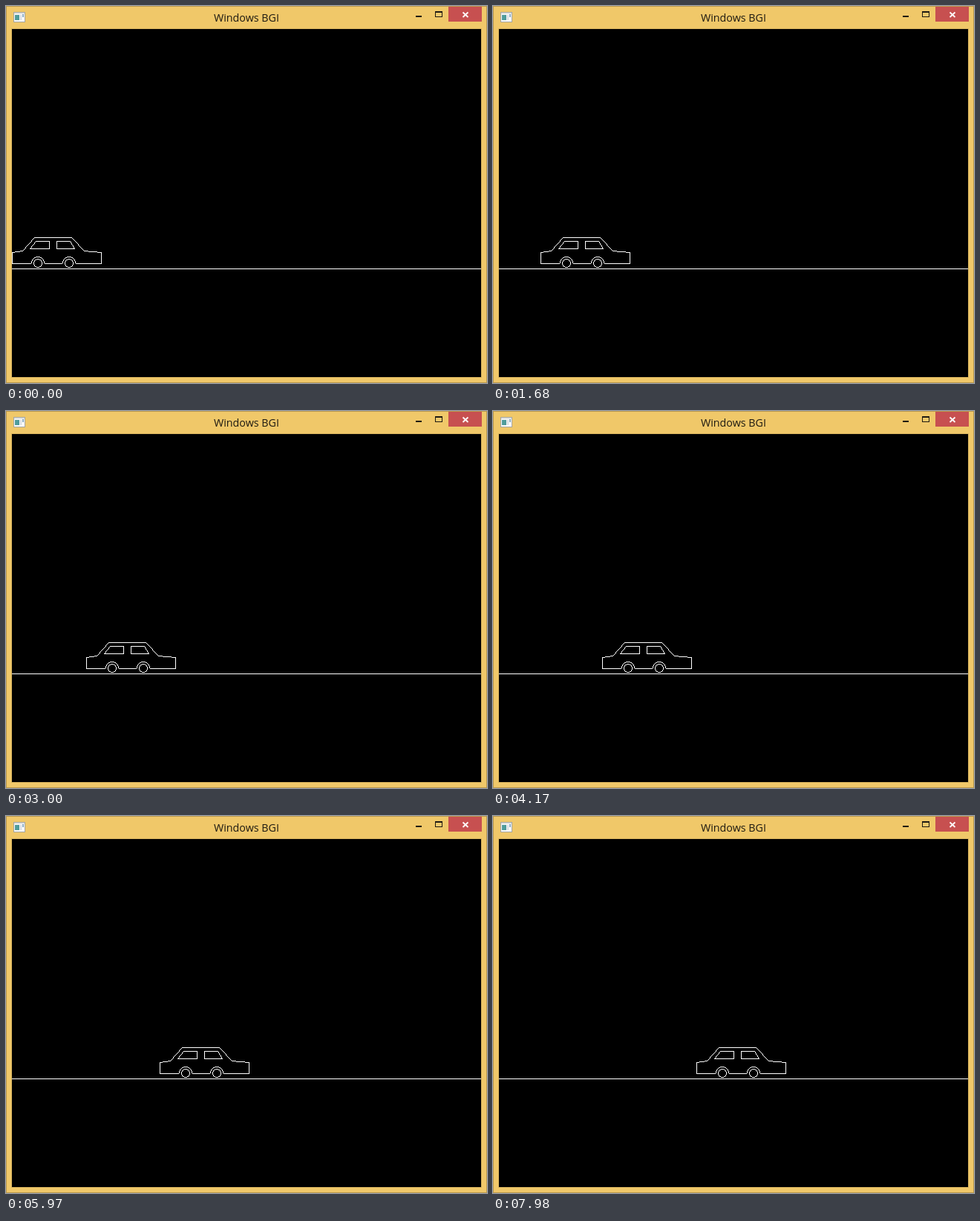
An HTML page with a canvas that plays this animation: 648x507 px, repeating every 8 s.

```html
<!DOCTYPE html>
<html lang="en">
<head>
<meta charset="utf-8">
<title>Windows BGI</title>
<style>
  html, body { margin: 0; width: 100%; height: 100%; overflow: hidden; background: #f0c869; }
  svg, canvas { position: absolute; display: block; }
  svg { left: 0; top: 0; }
  text { font: 14.3px "Open Sans", "Noto Sans", sans-serif; fill: #1e1a12; text-anchor: middle; }
  /* One pixel every 30 ms, then a short hold before the loop restarts. */
  canvas { left: 8px; top: 311px; animation: drive 8s -0.1ms infinite; }
  @keyframes drive {
    0% { transform: translateX(0); animation-timing-function: steps(266, end); }
    99.75%, 100% { transform: translateX(266px); }
  }
</style>
</head>
<body>
<svg width="648" height="507" viewBox="0 0 648 507">
  <rect x=".5" y=".5" width="647" height="506" fill="#f0c869" stroke="#b8984f"/>
  <rect x="7" y="30" width="634" height="470" fill="#d8b45e"/>
  <rect x="8" y="31" width="632" height="468"/>
  <rect x="8" y="353" width="632" height="1" fill="#fff"/>

  <g id="icon">
    <rect x="10.5" y="8.5" width="15" height="13" fill="#fafafa" stroke="#a5a69f"/>
    <rect x="11" y="9" width="14" height="2" fill="#dfe2e4"/>
    <rect x="12" y="12" width="6" height="7" fill="#4f9c9c"/>
    <rect x="19" y="12" width="2" height="7" fill="#d6dde2"/>
    <rect x="22" y="11" width="2" height="4" fill="#8fb0c8"/>
  </g>

  <text x="324" y="21">Windows BGI</text>

  <g id="buttons">
    <rect x="552" y="13" width="8" height="2" fill="#1e1a12"/>
    <path d="M578 7h10v8h-10zM579 9v5h8v-5z" fill="#1e1a12" fill-rule="evenodd"/>
    <rect x="596" y="1" width="45" height="20" fill="#c75050"/>
    <path d="M615.5 8.5l7 6.5M622.5 8.5l-7 6.5" stroke="#fff" stroke-width="1.8"/>
  </g>
</svg>
<canvas id="car" width="121" height="41"></canvas>

<script>
const ctx = document.getElementById('car').getContext('2d');
ctx.fillStyle = '#fff';
const dot = (x, y) => ctx.fillRect(Math.floor(x), Math.floor(y), 1, 1);

// Hard-edged line, both ends included.
function line(x0, y0, x1, y1) {
  const steps = Math.max(Math.abs(x1 - x0), Math.abs(y1 - y0));
  for (let i = 0; i <= steps; i++) {
    dot(Math.round(x0 + (x1 - x0) * i / steps), Math.round(y0 + (y1 - y0) * i / steps));
  }
}

function polyline(...points) {
  for (let i = 1; i < points.length; i++) line(...points[i - 1], ...points[i]);
}

// Circle of even diameter, mirrored from one octant; half draws the top only.
function circle(cx, cy, r, half) {
  const edge = r - 0.5;
  for (let a = 0.5; a <= edge; a++) {
    const b = Math.round(Math.sqrt(edge * edge - a * a) - 0.5) + 0.5;
    if (a > b) break;
    for (const [x, y] of [[a, b], [b, a]]) {
      for (const sx of [-x, x]) {
        dot(cx + sx, cy - y);
        if (!half) dot(cx + sx, cy + y);
      }
    }
  }
}

const sill = 35;
polyline([25, sill], [0, sill], [0, 20], [14, 18], [30, 0], [80, 0],
         [97, 18], [120, 20], [120, sill], [86, sill]);
line(44, sill, 67, sill);
polyline([24, 15], [32, 5], [50, 5], [50, 15], [24, 15]);
polyline([60, 15], [60, 5], [78, 5], [84, 15], [60, 15]);
for (const x of [35, 77]) {
  circle(x, sill, 9, true);
  circle(x, sill, 6);
}
</script>
</body>
</html>
```
